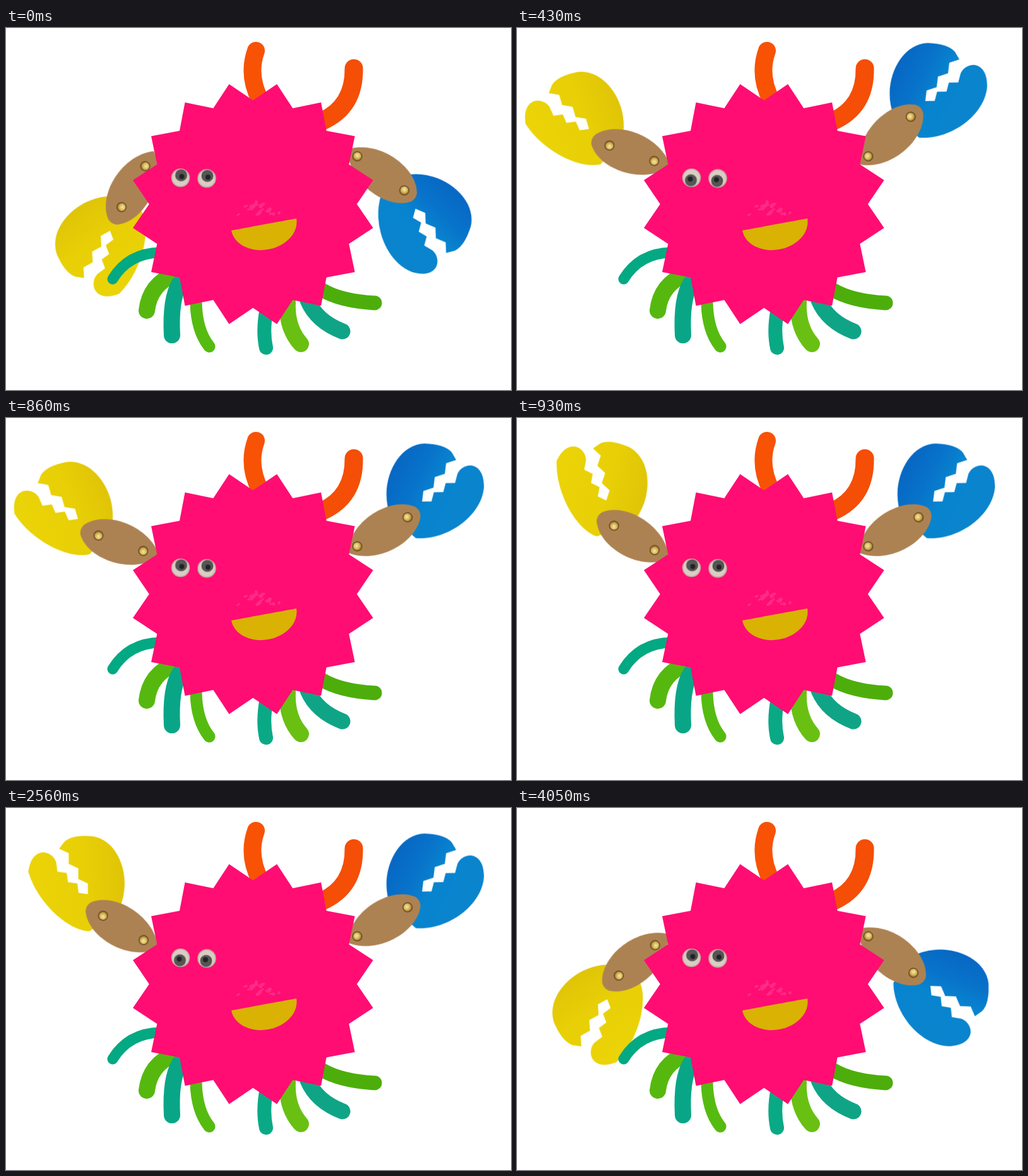
An HTML page for the animation above (5.98 s loop, 800 px wide and 574 px high).

```html
<!DOCTYPE html>
<html lang="en">
<head>
<meta charset="utf-8">
<title>Paper crab</title>
<style>
  html, body { margin: 0; width: 100%; height: 100%; overflow: hidden; background: #fff; }
  svg { display: block; width: 100vw; height: 100vh; }
</style>
</head>
<body>
<svg viewBox="0 0 800 574" xmlns="http://www.w3.org/2000/svg">
  <defs>
    <linearGradient id="blue" x1="0" y1=".3" x2=".8" y2=".7">
      <stop offset="0" stop-color="#0766c3"/>
      <stop offset=".35" stop-color="#0873ca"/>
      <stop offset=".6" stop-color="#0884cf"/>
      <stop offset="1" stop-color="#0a84cd"/>
    </linearGradient>
    <linearGradient id="yellow" x1="0" y1=".4" x2="1" y2=".6">
      <stop offset="0" stop-color="#dfc407"/>
      <stop offset=".4" stop-color="#e8cf06"/>
      <stop offset="1" stop-color="#ebd408"/>
    </linearGradient>
    <radialGradient id="brass" cx=".45" cy=".4" r=".6">
      <stop offset="0" stop-color="#f6e8ac"/>
      <stop offset=".6" stop-color="#d8b855"/>
      <stop offset="1" stop-color="#9a7430"/>
    </radialGradient>
    <g id="brad">
      <circle r="8" fill="#6b4a26"/>
      <circle r="6.5" fill="url(#brass)"/>
    </g>
    <path id="leaf" fill="#ad8252" d="M-66 0C-35 -42 40 -42 64 -8Q68 0 64 8C40 42 -35 42 -66 0Z"/>
  </defs>
  <g id="arms"></g>
  <g id="limbs" fill="none" stroke-linecap="round"></g>
  <path id="body" fill="#ff0d73"/>
  <g id="scuffs" fill="#ff4a9b" opacity=".5"></g>
  <path fill="#d9b204" d="M357 321A52 40 -10.5 0 0 460 302Z"/>
  <g id="eyes"></g>
</svg>
<script>
const LOOP = 5980;
const $ = id => document.getElementById(id);

// Hold each angle from its start time until the next one.
function turn(id, steps) {
  const frames = steps.map(([t, deg]) =>
    ({ offset: t / LOOP, easing: 'step-end', transform: `rotate(${deg}deg)` }));
  frames.push({ ...frames[frames.length - 1], offset: 1 });
  $(id).animate(frames, { duration: LOOP, iterations: Infinity }).startTime = 0;
}

// Zigzag cut between two points, every other corner pushed sideways.
function teeth([x0, y0], [x1, y1], depth, n = 6) {
  const dx = x1 - x0, dy = y1 - y0, len = Math.hypot(dx, dy);
  let d = '';
  for (let i = 1; i <= n; i++) {
    const push = i % 2 ? depth / len : 0;
    d += `L${x0 + dx * i / n - dy * push} ${y0 + dy * i / n + dx * push}`;
  }
  return d;
}

function claw(bulge) {
  const top = [80, -94], deep = [26, -28], low = [82, -72];
  return `M-24 -5C-44 -55 -15 -119 30 -120Q62 -119 73 -106L${top}`
    + teeth(top, deep, 9) + teeth(deep, low, 9)
    + `C92 -92 124 -92 124 -52C${110 + bulge} -8 ${56 + bulge} 34 16 30Z`;
}

// Each pose: start ms, arm angle, claw angle on the stage.
function arm({ id, x, y, slack, span, fit, bulge, fill, poses }) {
  $('arms').innerHTML += `<g transform="translate(${x} ${y})"><g id="${id}Arm">
    <g transform="translate(${slack + span})"><g id="${id}Claw">
      <path d="${claw(bulge)}" fill="url(#${fill})" transform="${fit}"/></g></g>
    <use href="#leaf" x="${slack + span / 2 + 1}"/>
    <use href="#brad" x="${slack}"/><use href="#brad" x="${slack + span}"/></g></g>`;
  return () => {
    turn(id + 'Arm', poses.map(([t, a]) => [t, a]));
    turn(id + 'Claw', poses.map(([t, a, c]) => [t, c - a]));
  };
}

const starts = [
  arm({
    id: 'left', x: 224, y: 213, slack: 7, span: 75, bulge: -4, fill: 'yellow',
    fit: 'scale(-1 1) translate(2 -3)',
    poses: [[0, 120, -112], [430, 199, -9], [930, 211, 25], [2330, 211, 7], [4050, 140, -112]],
  }),
  arm({
    id: 'right', x: 556.5, y: 203.5, slack: 0, span: 92, bulge: 12, fill: 'blue',
    fit: 'translate(-3 3)',
    poses: [[0, 36, 106], [400, -43, 0], [660, -43, -22], [860, -30, 0], [2990, -30, -22], [4050, 39, 85]],
  }),
];
starts.forEach(start => start());

// Antennae and legs: colour, width, bent centre line.
const limbs = [
  ['#f85205', 28, 'M403 115Q382 75 396 36'],
  ['#f54e06', 29, 'M500 148Q552 125 551 64'],
  ['#02a982', 17, 'M244 356Q194 357 169 398'],
  ['#56b80f', 26, 'M268 390Q228 406 223 448'],
  ['#08a687', 26, 'M275 405Q260 430 263 487'],
  ['#56bb10', 19, 'M301 436Q302 480 322 505'],
  ['#0aa986', 22, 'M413 445Q406 480 412 507'],
  ['#69c013', 26, 'M446 435Q444 475 467 501'],
  ['#10a487', 25, 'M478 432Q492 465 533 481'],
  ['#4dae0b', 23, 'M500 415Q530 433 584 436'],
];
$('limbs').innerHTML = limbs.map(([color, width, d]) =>
  `<path d="${d}" stroke="${color}" stroke-width="${width}"/>`).join('');

// Sixteen-pointed star.
const corners = Array.from({ length: 32 }, (_, i) => {
  const a = i * Math.PI / 16, r = i % 2 ? 194 : 164.5;
  return [391.3 + r * Math.sin(a), 279.2 - r * Math.cos(a)];
});
$('body').setAttribute('d', `M${corners.join('L')}Z`);

let seed = 7;
const rand = () => (seed = seed * 16807 % 2147483647) / 2147483647;
for (let i = 0; i < 18; i++) {
  const x = 368 + 70 * rand(), y = 272 + 26 * rand();
  $('scuffs').innerHTML += `<ellipse cx="${x}" cy="${y}" rx="${2 + 5 * rand()}" ry="${1 + 2 * rand()}"
    transform="rotate(${-50 * rand()} ${x} ${y})"/>`;
}

const eyes = [[276.5, 237.5], [318, 238.5]];
$('eyes').innerHTML = eyes.map(([x, y], i) => `<g transform="translate(${x} ${y})">
  <circle r="14.8" fill="#c4ad9e"/><circle r="13" fill="#d9cdc4"/>
  <g id="look${i}"><circle cx="1" cy="-4" r="9.5" fill="#555"/><circle cx="2" cy="-2" r="4" fill="#222"/></g>
</g>`).join('');
eyes.forEach((_, i) => turn('look' + i, [[0, 0], [430, 180], [660, 0], [2560, 180], [3220, 0]]));
</script>
</body>
</html>
```
